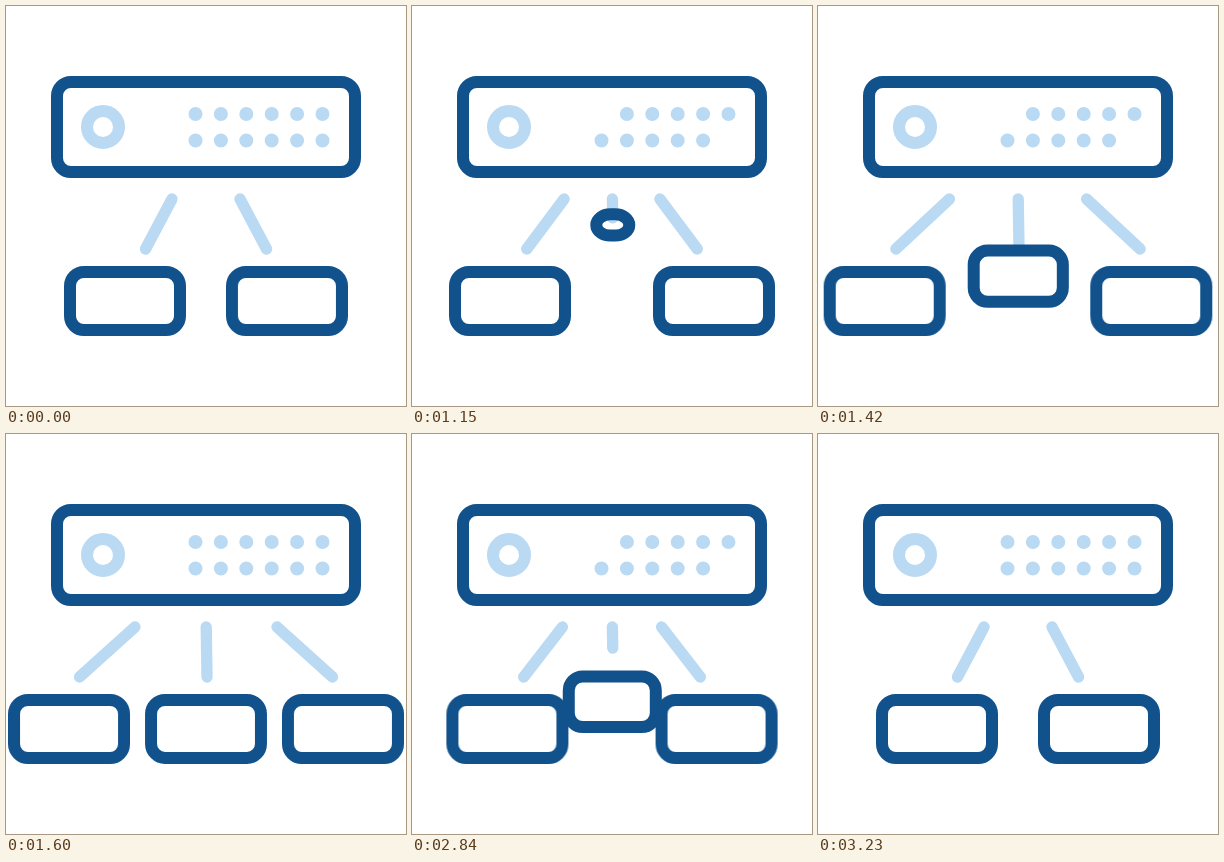
Write an HTML page without scripts that moves like this. It is 400 by 400 pixels and loops after 3.26 s.

```html
<!DOCTYPE html>
<html lang="en">
<head>
<meta charset="utf-8">
<title>Server scaling</title>
<style>
  html, body { margin: 0; width: 100%; height: 100%; overflow: hidden; background: #fff; }
  svg { display: block; width: 100vw; height: 100vh; }

  .dark, .light { fill: none; stroke-width: 12; }
  .dark { stroke: #12528c; }
  .light { stroke: #bad9f3; stroke-linecap: round; }
  .link { stroke-width: 11.3; }
  .dots { stroke-width: 14; }

  .node, .link, .box, .blink, .extra, .hole {
    animation: 3260ms infinite;
    --ease: cubic-bezier(.333, 0, .667, 1);
  }
  .node { animation-name: spread; }
  .link { animation-name: fan; }
  .drop { animation-name: drop; }
  .box { animation-name: grow; }
  .blink, .extra, .hole { animation-timing-function: step-end; }
  .blink { animation-name: blink; }
  .extra { animation-name: extra; }
  .hole { animation-name: hole; fill: #fff; }

  /* out 1010–1610 ms, back 2640–3240 ms */
  @keyframes spread {
    0%, 30.98%, 99.39%, 100% { transform: translateX(0); animation-timing-function: var(--ease); }
    49.39%, 80.98% { transform: translateX(-56px); animation-timing-function: var(--ease); }
  }
  @keyframes fan {
    0%, 30.98%, 99.39%, 100% { d: path("M166 193L139.5 243"); animation-timing-function: var(--ease); }
    49.39%, 80.98% { d: path("M129 193L73.5 243"); animation-timing-function: var(--ease); }
  }
  @keyframes drop {
    0%, 30.98%, 99.39%, 100% { d: path("M200.5 193L200.6 193.1"); animation-timing-function: var(--ease); }
    49.39%, 80.98% { d: path("M200.2 193L201 243"); animation-timing-function: var(--ease); }
  }
  @keyframes grow {
    0%, 30.98%, 99.39%, 100% { x: 201px; y: 193.5px; width: 0.1px; height: 0.1px; animation-timing-function: linear; }
    40.18% { x: 165.5px; y: 225px; width: 70px; height: 45px; animation-timing-function: cubic-bezier(.167, .167, .667, 1); }
    49.39% { x: 145px; y: 266px; width: 110px; height: 58px; }
    80.98% { x: 145px; y: 266px; width: 110px; height: 58px; animation-timing-function: cubic-bezier(.333, 0, .833, .833); }
    90.18% { x: 165.5px; y: 225px; width: 70px; height: 45px; animation-timing-function: linear; }
  }
  @keyframes extra {
    0%, 99.08%, 100% { opacity: 0; }
    31.59% { opacity: 1; }
  }
  @keyframes hole {
    0%, 33%, 99.08%, 100% { opacity: 0; }
    31.59%, 97.7% { opacity: 1; }
  }
  @keyframes blink {
    0%, 45.4%, 99.08%, 100% { opacity: 1; }
    35.28%, 85.28% { opacity: 0; }
  }
</style>
</head>
<body>
<svg viewBox="0 0 400 400">
  <!-- server -->
  <rect class="dark" x="51" y="76" width="298" height="90" rx="14"/>
  <circle class="light" cx="97" cy="121" r="16"/>
  <path class="light dots" d="M214.9 108h0m25.4 0h0m25.4 0h0m25.4 0h0m25.4 0h0M189.5 134.5h0m25.4 0h0m25.4 0h0m25.4 0h0m25.4 0h0"/>
  <path class="light dots blink" d="M189.5 108h0M316.5 134.5h0"/>

  <!-- outer nodes -->
  <g>
    <path class="light link" d="M166 193L139.5 243"/>
    <rect class="dark node" x="64" y="266" width="110" height="58" rx="14"/>
  </g>
  <g transform="translate(400) scale(-1 1)">
    <path class="light link" d="M166 193L139.5 243"/>
    <rect class="dark node" x="64" y="266" width="110" height="58" rx="14"/>
  </g>

  <!-- middle node -->
  <g class="extra">
    <path class="light link drop" d="M200.5 193L200.6 193.1"/>
    <rect class="dark box" x="201" y="193.5" width="0.1" height="0.1" rx="14"/>
    <ellipse class="hole" cx="201" cy="198.5" rx="2" ry="2.8"/>
  </g>
</svg>
</body>
</html>
```
